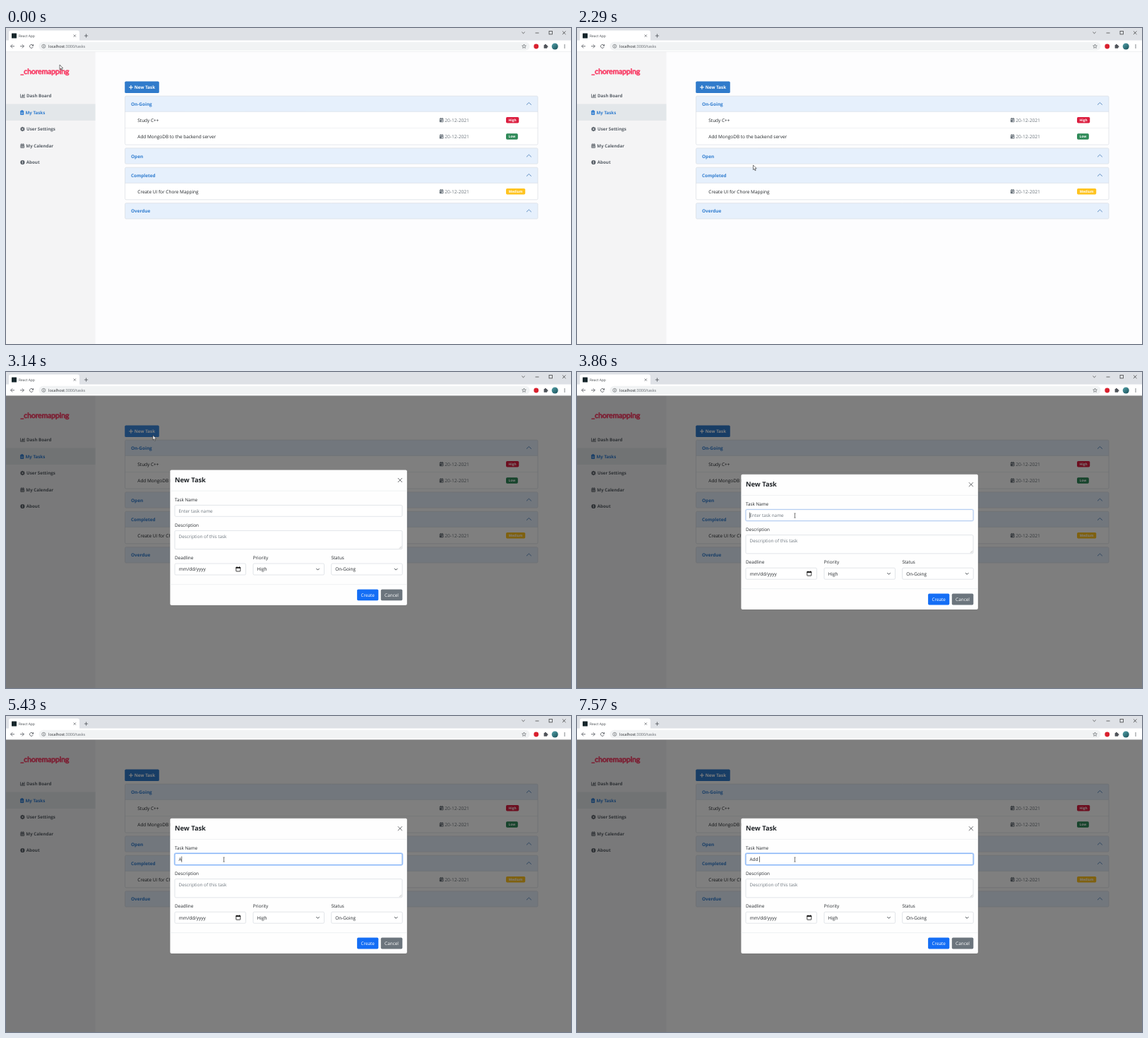
An HTML page with a canvas that plays this animation: 800x447 px, repeating every 8000 ms.

```html
<!DOCTYPE html>
<html lang="en">
<head>
<meta charset="utf-8">
<title>React App</title>
<style>
  html, body { margin: 0; width: 100%; height: 100%; overflow: hidden; background: #fdfdfe; }
  canvas { display: block; width: 100%; height: 100%; }
</style>
</head>
<body>
<canvas id="stage"></canvas>
<script>
const W = 800, H = 447, LOOP = 8000, STEP = 1000 / 7;
const canvas = document.getElementById('stage');
const ctx = canvas.getContext('2d');
const ratio = window.devicePixelRatio || 1;
canvas.width = W * ratio;
canvas.height = H * ratio;

const SANS = '"Open Sans", "Noto Sans", sans-serif';
const BLUE = '#2f7ccf', GREY = '#596068', MUTED = '#6c757d', INK = '#212529';

// ---------- helpers ----------
function rect(x, y, w, h, fill) {
  ctx.fillStyle = fill;
  ctx.fillRect(x, y, w, h);
}

function box(x, y, w, h, r, fill, stroke, width = 0.6) {
  ctx.beginPath();
  ctx.roundRect(x, y, w, h, r);
  if (fill) { ctx.fillStyle = fill; ctx.fill(); }
  if (stroke) { ctx.strokeStyle = stroke; ctx.lineWidth = width; ctx.stroke(); }
}

function disc(x, y, r, fill) {
  ctx.beginPath();
  ctx.arc(x, y, r, 0, Math.PI * 2);
  ctx.fillStyle = fill;
  ctx.fill();
}

function line(color, width, ...p) {
  ctx.beginPath();
  ctx.moveTo(p[0], p[1]);
  for (let i = 2; i < p.length; i += 2) ctx.lineTo(p[i], p[i + 1]);
  ctx.strokeStyle = color;
  ctx.lineWidth = width;
  ctx.stroke();
}

// mid is the vertical centre of the capitals
function text(str, x, mid, size, color, weight = 400, align = 'left') {
  ctx.font = `${weight} ${size}px ${SANS}`;
  ctx.textAlign = align;
  ctx.fillStyle = color;
  ctx.fillText(str, x, mid + size * 0.357);
}

function cross(x, y, r, color, width) {
  line(color, width, x - r, y - r, x + r, y + r);
  line(color, width, x - r, y + r, x + r, y - r);
}

function plus(x, y, r, color, width) {
  line(color, width, x - r, y, x + r, y);
  line(color, width, x, y - r, x, y + r);
}

function chevron(x, y, w, h, color, width) {
  line(color, width, x - w, y - h, x, y + h, x + w, y - h);
}

function calendar(x, y, color, hole) {
  box(x, y + 0.8, 5.6, 5.6, 0.7, color);
  rect(x + 1.2, y, 0.9, 1.4, color);
  rect(x + 3.5, y, 0.9, 1.4, color);
  rect(x, y + 2.2, 5.6, 0.5, hole);
  rect(x + 3.1, y + 3.9, 1.5, 1.5, hole);
}

// ---------- browser frame ----------
function drawBrowser() {
  const dark = '#50545a';
  rect(0, 0, W, 18, '#dee1e6');
  box(4, 3.5, 100, 18, 3, '#fff');
  rect(0, 17.5, W, 16, '#fff');
  box(8, 7.5, 7, 7, 0.5, '#16272c');
  text('React App', 18, 11.2, 4.85, '#45494e');
  cross(97.3, 11, 1.6, dark, 0.7);
  plus(113.5, 11, 2.6, dark, 0.8);

  chevron(732.5, 6.7, 2.1, 1, '#333', 0.7);
  line('#333', 0.7, 749.5, 7, 754.5, 7);
  ctx.strokeRect(769, 4.5, 4.4, 4.4);
  cross(790.2, 6.8, 2.3, '#333', 0.7);

  line(dark, 0.8, 12, 25.8, 6.6, 25.8);
  line(dark, 0.8, 9.2, 23.2, 6.6, 25.8, 9.2, 28.4);
  line(dark, 0.8, 20, 25.8, 25.4, 25.8);
  line(dark, 0.8, 22.8, 23.2, 25.4, 25.8, 22.8, 28.4);
  ctx.beginPath();
  ctx.arc(36, 25.9, 2.5, 0.4, 5.4);
  ctx.stroke();
  ctx.beginPath();
  ctx.moveTo(39, 22.8); ctx.lineTo(39, 25.4); ctx.lineTo(36.4, 25.4);
  ctx.fillStyle = dark;
  ctx.fill();

  box(46.5, 19.8, 695, 12, 6, '#f1f3f4');
  ctx.beginPath();
  ctx.arc(53.3, 25.8, 2.5, 0, Math.PI * 2);
  ctx.lineWidth = 0.6;
  ctx.stroke();
  rect(52.95, 25.4, 0.7, 1.9, dark);
  rect(52.95, 24.1, 0.7, 0.7, dark);
  text('localhost', 60, 25.8, 5.5, '#25282c');
  const w = ctx.measureText('localhost').width;
  text(':3000/tasks', 60 + w, 25.8, 5.5, '#62676d');

  ctx.beginPath();
  for (let i = 0; i < 10; i++) {
    const a = -Math.PI / 2 + i * Math.PI / 5, r = i % 2 ? 1.35 : 3;
    ctx.lineTo(733.5 + r * Math.cos(a), 26 + r * Math.sin(a));
  }
  ctx.closePath();
  ctx.lineWidth = 0.6;
  ctx.stroke();
  disc(750.7, 26, 3.4, '#d9202e');
  box(761.6, 24, 4.6, 4.8, 0.5, dark);
  disc(763.8, 23.8, 1.1, dark);
  disc(766.4, 26.3, 1.1, dark);
  const sea = ctx.createLinearGradient(773, 21, 781, 31);
  sea.addColorStop(0, '#57a5ad');
  sea.addColorStop(1, '#174f57');
  disc(777.2, 26, 4.5, sea);
  for (let i = -1; i < 2; i++) disc(791, 26 + i * 2, 0.65, dark);
}

// ---------- page ----------
const menu = [
  ['Dash Board', 29, 96], ['My Tasks', 27.5, 119.5], ['User Settings', 29, 143],
  ['My Calendar', 28.3, 166.7], ['About', 28.8, 190]
];

const menuIcons = [
  y => {
    line(GREY, 0.8, 20.6, y - 2.6, 20.6, y + 2.3, 27, y + 2.3);
    [1.6, 3.6, 2.6, 4].forEach((h, i) => rect(21.8 + i * 1.25, y + 1.4 - h, 0.9, h, GREY));
  },
  y => {
    box(20.2, y - 2.6, 5, 6, 0.7, BLUE);
    rect(21.6, y - 3.3, 2.2, 1.4, BLUE);
    [-0.6, 0.7, 2].forEach(d => rect(21.3, y + d, 2.8, 0.45, '#e3e7ea'));
  },
  y => {
    for (let i = 0; i < 4; i++) {
      const a = i * Math.PI / 4, c = 3.2 * Math.cos(a), s = 3.2 * Math.sin(a);
      line(GREY, 1.4, 23.4 - c, y - s, 23.4 + c, y + s);
    }
    disc(23.4, y, 2.4, GREY);
    disc(23.4, y, 1.05, '#f4f4f5');
  },
  y => {
    calendar(20.4, y - 3.3, GREY, '#f4f4f5');
    rect(21.4, y + 0.6, 1.1, 1.5, '#f4f4f5');
  },
  y => {
    disc(23.4, y, 3.1, GREY);
    rect(22.9, y - 0.5, 1, 2.2, '#f4f4f5');
    rect(22.9, y - 1.9, 1, 0.9, '#f4f4f5');
  }
];

function drawSidebar() {
  rect(0, 33.5, 126.5, H - 33.5, '#f4f4f5');
  rect(0, 107.5, 126.5, 23.5, '#e3e7ea');
  ctx.font = '400 10.3px Lato, sans-serif';
  ctx.textAlign = 'left';
  ctx.fillStyle = ctx.strokeStyle = '#f84a70';
  ctx.lineWidth = 0.9;
  ctx.lineJoin = 'round';
  ctx.fillText('_choremapping', 20.5, 64.6);
  ctx.strokeText('_choremapping', 20.5, 64.6);
  ctx.lineJoin = 'miter';
  menu.forEach(([label, x, y], i) => {
    menuIcons[i](y);
    text(label, x, y, 6.2, i === 1 ? BLUE : GREY, 700);
  });
}

const groups = [
  ['On-Going', 96, [
    ['Study C++', 'High', 18.2, '#dc1f40'],
    ['Add MongoDB to the backend server', 'Low', 16.8, '#2f8a58']
  ]],
  ['Open', 169.7, []],
  ['Completed', 197, [['Create UI for Chore Mapping', 'Medium', 27.2, '#ffc420']]],
  ['Overdue', 247.5, []]
];

function drawTasks(hover) {
  box(168.2, 75.6, 48.6, 16.4, 1.6, hover ? '#3d8add' : '#307bcb');
  plus(176.9, 83.9, 2.8, '#fff', 1.1);
  text('New Task', 181.8, 84, 6.2, '#fff', 700);

  const edge = '#d3d8df';
  for (const [name, top, rows] of groups) {
    const bottom = top + 22.3 + rows.length * 23.3;
    box(168.5, top + 0.2, 584.5, bottom - top, 1.7, '#fff');
    box(168.5, top + 0.2, 584.5, 22.2, rows.length ? [1.7, 1.7, 0, 0] : 1.7, '#e6f0fc');
    text(name, 177, top + 11.7, 6.4, BLUE, 700);
    chevron(740.4, top + 11.1, 3.4, -1.6, '#3f78b5', 0.8);
    rows.forEach(([title, level, width, color], i) => {
      const y = top + 22.3 + i * 23.3, mid = y + 12;
      line(i ? '#e3e5e8' : edge, 0.5, 168.5, y, 753, y);
      text(title, 186.3, mid, 6.47, INK);
      calendar(613.8, mid - 3.4, MUTED, '#fff');
      text('20-12-2021', 621.2, mid, 6.65, MUTED);
      box(708, mid - 4.4, width, 8.6, 1.7, color);
      text(level, 708 + width / 2, mid, 4.8, '#fff', 700, 'center');
    });
    box(168.5, top + 0.2, 584.5, bottom - top, 1.7, null, edge);
  }
}

// ---------- dialog ----------
// time, typed text, caret visible
const typing = [
  [3860, '', 1], [4430, '', 0], [5000, '', 1], [5430, 'A', 1], [6000, 'A', 0],
  [6140, 'Ad', 1], [6290, 'Add', 1], [6570, 'Add ', 1], [7000, 'Add ', 0], [7570, 'Add ', 1]
];

function field(x, y, w, h) {
  box(x, y, w, h, 1.6, '#fff', '#ced4da');
}

function select(x, label, value) {
  text(label, x - 0.3, 269, 6.35, INK);
  field(x, 277.2, 100.5, 16);
  text(value, x + 5.5, 285.2, 6.45, INK);
  chevron(x + 91.5, 285.2, 2.2, 1.1, '#343a40', 0.9);
}

function drawDialog(t) {
  box(232.3, 144.8, 335.6, 191.3, 2, '#fefefe', 'rgba(0,0,0,.2)', 0.4);
  text('New Task', 239, 158.4, 9.3, INK, 700);
  cross(557.9, 159.2, 3, '#55585c', 0.85);
  line('#dee2e6', 0.5, 232.3, 174.4, 567.9, 174.4);
  line('#dee2e6', 0.5, 232.3, 306.6, 567.9, 306.6);

  text('Task Name', 239, 186.7, 6.3, INK);
  const focus = t < 3850 ? 0 : t < 3990 ? 0.25 : 1;
  if (focus) box(238.6, 194.1, 322.9, 16.8, 2.2, null, `rgba(13,110,253,${0.3 * focus})`, 1.7);
  field(239, 194.6, 322, 15.9);
  if (focus) box(239, 194.6, 322, 15.9, 1.6, null, `rgba(110,168,250,${0.35 + 0.65 * focus})`, 0.8);
  const state = typing.filter(k => k[0] <= t + 5).pop();
  const typed = state ? state[1] : '';
  if (typed) text(typed, 244.5, 202.7, 6.4, INK);
  else text('Enter task name', 244.5, 202.7, 6.35, MUTED);
  if (state && state[2]) {
    rect(244.5 + ctx.measureText(typed).width * (typed ? 1 : 0), 198.6, 0.6, 8.2, '#111');
  }

  text('Description', 239, 222.7, 6.35, INK);
  field(239, 230.6, 322, 26.2);
  text('Description of this task', 244.5, 239.2, 6.37, MUTED);
  line('#777', 0.4, 557, 255.8, 560, 252.8);
  line('#777', 0.4, 558.8, 255.8, 560, 254.6);

  text('Deadline', 239, 269, 6.35, INK);
  field(239, 277.2, 100.5, 16);
  text('mm/dd/yyyy', 244.8, 285.2, 6.5, INK);
  box(325.8, 282.6, 6, 5.6, 0.4, null, '#111', 0.8);
  rect(325.5, 282.2, 6.6, 1.7, '#111');
  rect(326.6, 281.4, 0.8, 1, '#111');
  rect(330.2, 281.4, 0.8, 1, '#111');
  select(350, 'Priority', 'High');
  select(460.7, 'Status', 'On-Going');

  box(497.1, 313.6, 30.2, 15.9, 1.7, '#146ef5');
  text('Create', 512.2, 321.9, 6.4, '#fff', 400, 'center');
  box(530.8, 313.6, 30.5, 15.9, 1.7, '#6c757d');
  text('Cancel', 546, 321.9, 6.4, '#fff', 400, 'center');
}

// ---------- pointer ----------
const path = [
  [0, 76, 52], [714, 168, 254], [857, 168, 254], [1286, 200.5, 388.5], [1571, 291, 299],
  [1714, 291, 299], [2857, 208, 89], [3143, 208, 89.5], [3786, 308.5, 203]
];

function pointerAt(t) {
  const i = path.findIndex(p => p[0] > t);
  if (i < 0) return path[path.length - 1].slice(1);
  const [t0, x0, y0] = path[i - 1], [t1, x1, y1] = path[i];
  const u = (t - t0) / (t1 - t0), e = u * u * (3 - 2 * u);
  return [x0 + (x1 - x0) * e, y0 + (y1 - y0) * e];
}

function drawPointer(x, y, beam) {
  if (beam) {
    line('#222', 0.6, x, y - 2.8, x, y + 3);
    line('#222', 0.5, x - 1.2, y - 3, x + 1.2, y - 3);
    line('#222', 0.5, x - 1.2, y + 3.2, x + 1.2, y + 3.2);
    return;
  }
  ctx.beginPath();
  [[0, 0], [0, 6.6], [1.5, 5.2], [2.6, 7.8], [3.7, 7.3], [2.6, 4.9], [4.7, 4.8]]
    .forEach(([dx, dy]) => ctx.lineTo(x + dx, y + dy));
  ctx.closePath();
  ctx.fillStyle = '#fff';
  ctx.fill();
  ctx.strokeStyle = '#222';
  ctx.lineWidth = 0.6;
  ctx.stroke();
}

// ---------- loop ----------
const OPEN = 2988;
const clamp = v => Math.max(0, Math.min(1, v));

// CSS ease-out: cubic-bezier(0, 0, .58, 1)
function easeOut(u) {
  let lo = 0, hi = 1;
  for (let i = 0; i < 20; i++) {
    const s = (lo + hi) / 2;
    if (1.74 * s * s * (1 - s) + s * s * s < u) lo = s; else hi = s;
  }
  return lo * lo * (3 - 2 * lo);
}

function draw(t) {
  ctx.setTransform(ratio, 0, 0, ratio, 0, 0);
  ctx.textRendering = 'geometricPrecision';
  const [x, y] = pointerAt(t);
  const hover = t < 3200 && x > 168 && x < 217 && y > 75 && y < 92;

  rect(0, 0, W, H, '#fdfdfe');
  drawBrowser();
  drawSidebar();
  drawTasks(hover);
  line('#dfe1e5', 0.5, 0, 33.5, W, 33.5);

  const fade = clamp((t - OPEN) / 150);
  if (fade) {
    rect(0, 33.5, W, H - 33.5, `rgba(0,0,0,${0.5 * fade})`);
    ctx.save();
    ctx.globalAlpha = fade;
    ctx.translate(0, -20.8 * (1 - easeOut(clamp((t - OPEN) / 300))));
    drawDialog(t);
    ctx.restore();
  }
  drawPointer(x, y, fade === 1 && y > 195 && y < 210 && x > 239);
}

const start = performance.now();
function tick() {
  const t = (performance.now() - start) % LOOP;
  draw(Math.floor((t + 3) / STEP) * STEP);
  requestAnimationFrame(tick);
}
tick();
</script>
</body>
</html>
```
